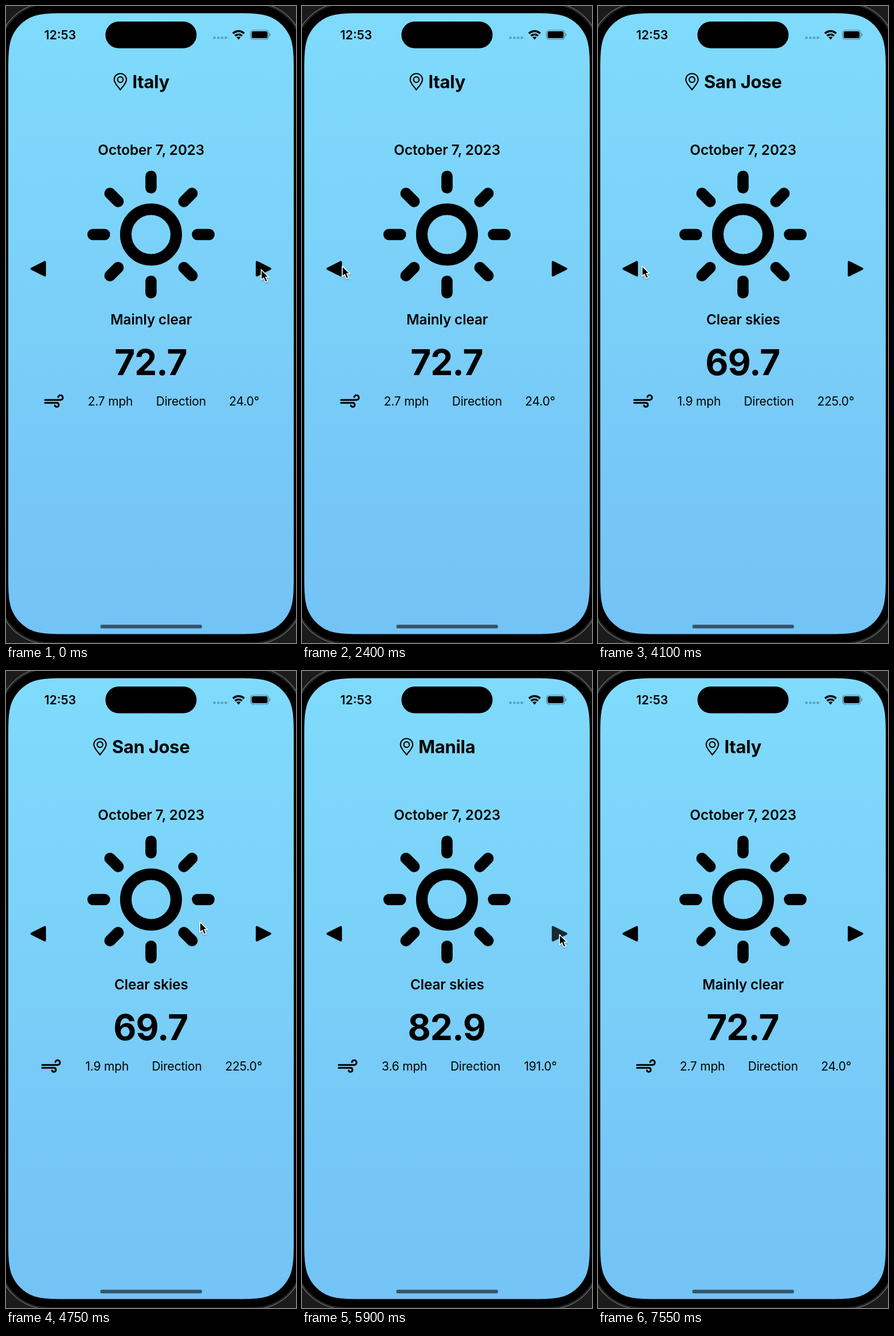
An HTML page that plays this animation: 506 px wide and 1108 px high, repeating every 7.6 s.

```html
<!DOCTYPE html>
<html lang="en">
<head>
<meta charset="utf-8">
<title>Weather</title>
<style>
  html, body { margin: 0; width: 100%; height: 100%; overflow: hidden; background: #1b1b1c; }
  svg { display: block; width: 506px; height: 1108px; }
  text { font-family: Inter, "Liberation Sans", sans-serif; text-anchor: middle; }
  .semi { font-weight: 600; font-size: 24.3px; letter-spacing: -.1px; }
  .row { font-size: 21px; letter-spacing: -.2px; }
  .line { fill: none; stroke: #000; stroke-linecap: round; stroke-linejoin: round; }
</style>
</head>
<body>
<svg viewBox="0 0 506 1108">
  <defs>
    <linearGradient id="sky" x1="0" y1="0" x2="0" y2="1">
      <stop offset="0" stop-color="#7fdbfc"/>
      <stop offset=".5" stop-color="#7acff8"/>
      <stop offset=".8" stop-color="#75c6f7"/>
      <stop offset="1" stop-color="#74c3f6"/>
    </linearGradient>
    <filter id="soft" x="-50%" y="-50%" width="200%" height="200%">
      <feDropShadow dx="0" dy="1.5" stdDeviation="1.2" flood-opacity=".35"/>
    </filter>
  </defs>

  <rect x="-14" y="-6" width="534" height="1116" rx="88" fill="#000" stroke="#6b6b6b" stroke-width="1.4"/>
  <rect x="-12" y="-4" width="530" height="1112" rx="86" fill="#000" stroke="#262626" stroke-width="2.5"/>
  <path id="screen" fill="url(#sky)"/>

  <text x="94.5" y="58" font-size="21.2" font-weight="600">12:53</text>
  <rect x="173.5" y="27" width="159" height="46.5" rx="23.2"/>
  <g id="dots" opacity=".27"></g>
  <g class="line" stroke-width="3.4" style="stroke-linecap:butt">
    <path d="M396 47.8A14 14 0 0 1 415.6 47.8"/>
    <path d="M399.6 52A8.8 8.8 0 0 1 412 52"/>
  </g>
  <path d="M402.3 54.8A5 5 0 0 1 409.3 54.8L405.8 58.4Z"/>
  <rect x="426.6" y="42" width="31.8" height="16" rx="5" fill="none" stroke="#000" stroke-opacity=".4" stroke-width="1.2"/>
  <rect x="428.6" y="44" width="27.8" height="12" rx="3.3"/>
  <path d="M459.6 47.4Q461.4 48 461.4 50T459.6 52.6Z" opacity=".45"/>

  <g id="pin" class="line" stroke-width="2.1">
    <path d="M0 145.8C-3.5 140.5 -10.7 134.5 -10.7 128A10.7 10.5 0 0 1 10.7 128C10.7 134.5 3.5 140.5 0 145.8Z"/>
    <circle cy="128" r="4.9"/>
  </g>
  <text id="city" x="252.8" y="143" font-size="31" font-weight="700" letter-spacing="-.3"></text>

  <text class="semi" x="253.3" y="258.5">October 7, 2023</text>
  <circle cx="253" cy="397.5" r="44" fill="none" stroke="#000" stroke-width="20"/>
  <g id="rays" transform="translate(253 397.5)"></g>
  <path id="left" class="line" style="fill:#000" stroke-width="4" d="M44.7 457L67.7 445.6V468.4Z"/>
  <path id="right" class="line" style="fill:#000" stroke-width="4" d="M460.8 457L437.8 445.6V468.4Z"/>
  <text class="semi" id="sky-text" x="253.3" y="553.5"></text>
  <text id="temp" x="252.3" y="642" font-size="62" font-weight="700" letter-spacing="-1"></text>

  <g id="wind" class="line" stroke-width="3">
    <path d="M1.5 685.2H28.5A4.1 4.1 0 1 0 24.6 680.2"/>
    <path d="M1.5 690.2H22A3.5 3.5 0 1 1 18.7 694.8"/>
  </g>
  <text class="row" id="speed" y="695"></text>
  <text class="row" id="label" y="695">Direction</text>
  <text class="row" id="angle" y="695"></text>

  <rect x="164.5" y="1076.2" width="177.5" height="6.3" rx="3.1" fill="#345468"/>
  <path id="cursor" filter="url(#soft)" stroke="#fff" stroke-width="1.5" stroke-linejoin="round"
    d="M.3 .5V18.6L4.5 14.8L7.6 22.2L11.2 20.7L8.1 13.5H13.4Z"/>
</svg>
<script>
const LOOP = 7600;
const $ = id => document.getElementById(id);

// Smooth phone corner: the same curve mirrored into all four corners.
function screenPath(x0, y0, x1, y1, r) {
  const side = [[1.5287, 0], [1.0885, 0], [.8684, 0], [.6315, .0749],
    [.3728, .1691], [.1691, .3728], [.0749, .6315], [0, .8684], [0, 1.0885], [0, 1.5287]];
  const corner = (x, y, sx, sy, flip) => {
    const p = side.map(([a, b]) => (x + sx * a * r) + " " + (y + sy * b * r));
    if (flip) p.reverse();
    return p[0] + "C" + p.slice(1).join(" ");
  };
  return "M" + corner(x0, y0, 1, 1) + "L" + corner(x0, y1, 1, -1, true) +
    "L" + corner(x1, y1, -1, -1) + "L" + corner(x1, y0, -1, 1, true) + "Z";
}
$("screen").setAttribute("d", screenPath(4, 12.5, 502, 1092.5, 70));

$("dots").innerHTML = [0, 1, 2, 3].map(i =>
  `<circle cx="${363.8 + i * 6.6}" cy="55.3" r="2.3"/>`).join("");
$("rays").innerHTML = [...Array(8).keys()].map(i =>
  `<rect x="-9.8" y="-111" width="19.6" height="39.6" rx="9.5" transform="rotate(${i * 45})"/>`).join("");

const pinX = { "Italy": 199.5, "Manila": 182.5, "San Jose": 164 };
const reports = {
  italy: { sky: "Mainly clear", temp: "72.7", speed: "2.7 mph", angle: "24.0°", x: [66.5, 182, 305.3, 415.5] },
  manila: { sky: "Clear skies", temp: "82.9", speed: "3.6 mph", angle: "191.0°", x: [62.5, 178.7, 302.5, 416] },
  sanJose: { sky: "Clear skies", temp: "69.7", speed: "1.9 mph", angle: "225.0°", x: [61.5, 176.3, 298, 414.7] }
};

// The name changes on the click, the report arrives a little later.
const cities = [[0, "Italy"], [2550, "Manila"], [3200, "San Jose"], [5450, "Manila"], [5950, "Italy"]];
const loads = [[0, "italy"], [2750, "manila"], [3450, "sanJose"], [5650, "manila"], [6150, "italy"]];
const presses = [["left", 2450], ["left", 3100], ["right", 5350], ["right", 5850]];
const path = [[0, 445, 458], [1500, 445, 458], [2300, 70, 452], [4050, 70, 452],
  [4600, 338, 436], [4850, 338, 436], [5250, 449, 458], [6200, 449, 458], [6600, 430, 1130]];

const pick = (table, t) => table.filter(row => row[0] <= t).pop()[1];
const ease = u => u * u * (3 - 2 * u);

function cursorAt(t) {
  const i = path.findIndex(p => p[0] > t);
  if (i < 0) return path[path.length - 1].slice(1);
  const [a, b] = [path[i - 1], path[i]];
  const u = ease((t - a[0]) / (b[0] - a[0]));
  return [a[1] + (b[1] - a[1]) * u, a[2] + (b[2] - a[2]) * u];
}

function setText(id, value) {
  if ($(id).textContent !== value) $(id).textContent = value;
}

function draw(t) {
  const city = pick(cities, t), r = reports[pick(loads, t)];
  setText("city", city);
  $("pin").setAttribute("transform", `translate(${pinX[city]} 0)`);
  setText("sky-text", r.sky);
  setText("temp", r.temp);
  setText("speed", r.speed);
  setText("angle", r.angle);
  $("wind").setAttribute("transform", `translate(${r.x[0]} 0)`);
  ["speed", "label", "angle"].forEach((id, i) => $(id).setAttribute("x", r.x[i + 1]));
  for (const id of ["left", "right"]) {
    const down = presses.some(([side, at]) => side === id && t >= at && t < at + 100);
    $(id).setAttribute("opacity", down ? .8 : 1);
  }
  $("cursor").setAttribute("transform", `translate(${cursorAt(t).join(" ")})`);
}

function tick() {
  draw(performance.now() % LOOP);
  requestAnimationFrame(tick);
}
tick();
</script>
</body>
</html>
```
